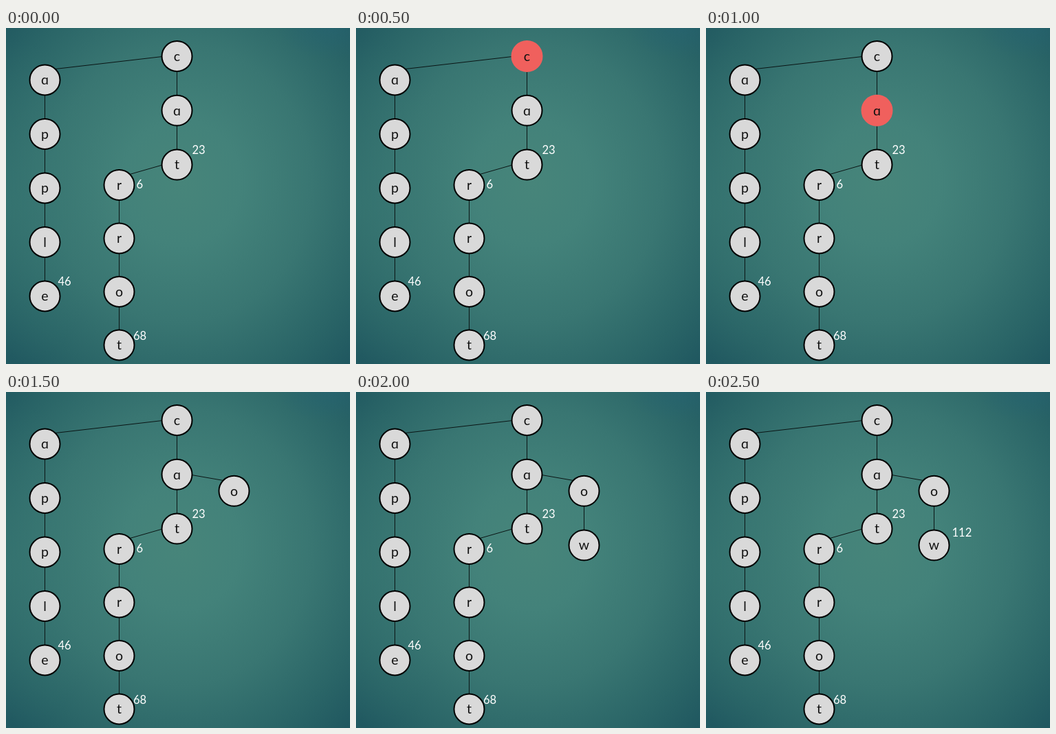
Recreate the animation shown at these times as an HTML page. Size 500 px wide and 488 px high, loop 3000 ms.

```html
<!DOCTYPE html>
<html lang="en">
<head>
<meta charset="utf-8">
<title>Trie insertion</title>
<style>
  html, body { margin: 0; width: 100%; height: 100%; overflow: hidden; }
  body {
    background:
      radial-gradient(ellipse 75px 45px at 470px 0, #27657399, #27657300),
      radial-gradient(ellipse 150px 240px at 0 255px, #3a7a7488, #3a7a7400),
      radial-gradient(ellipse 345px 365px at 255px 225px,
        #47857a 0%, #43827a 25%, #397672 55%, #2a6567 82%, #205860 100%);
  }
  svg { display: block; width: 500px; height: 488px; }
  line { stroke: #0a1414; stroke-width: 1; }
  circle { fill: #d9d9d9; stroke: #000; stroke-width: 2; }
  .active circle { fill: #f0605d; stroke: #f0605d; }
  text { font-family: Lato, "Noto Sans", sans-serif; }
  .letter { font-size: 19.5px; text-anchor: middle; fill: #111; }
  .value { font-size: 16.6px; fill: #fff; }
</style>
</head>
<body>
<svg viewBox="0 0 500 488"></svg>
<script>
const STEP = 500, STEPS = 6;
const svg = document.querySelector('svg');
const timed = [];

function add(parent, tag, attrs, text = '') {
  const el = document.createElementNS('http://www.w3.org/2000/svg', tag);
  for (const key in attrs) el.setAttribute(key, attrs[key]);
  el.textContent = text;
  return parent.appendChild(el);
}

function showFrom(el, step) {
  timed.push(now => el.setAttribute('visibility', now >= step ? 'visible' : 'hidden'));
}

function link(x1, y1, x2, y2, step = 0) {
  showFrom(add(svg, 'line', { x1, y1, x2, y2 }), step);
}

function node(x, y, letter, step = 0) {
  const g = add(svg, 'g', {});
  add(g, 'circle', { cx: x, cy: y, r: 22 });
  // The script form of "a" has a single storey.
  add(g, 'text', { class: 'letter', x, y: y + 6.8 }, letter.replace('a', 'ɑ'));
  showFrom(g, step);
  return g;
}

function chain(x, y, gap, word, step = 0) {
  if (word.length > 1) link(x, y, x, y + gap * (word.length - 1), step + (step && 1));
  return [...word].map((letter, i) => node(x, y + gap * i, letter, step && step + i));
}

function value(x, y, number, step = 0) {
  showFrom(add(svg, 'text', { class: 'value', x, y }, number), step);
}

link(227, 41.5, 72, 59.5);
link(227, 199, 180, 212.5);
link(270, 120.5, 316, 128.5, 3);

chain(56.5, 75.5, 78.5, 'apple');
const [c, a] = chain(248.5, 41, 78.8, 'cat');
chain(164.5, 228, 77.5, 'rrot');
chain(331.5, 143.8, 78.8, 'ow', 3);

value(75.5, 374, 46);
value(270.5, 182.5, 23);
value(189.5, 233, 6);
value(185, 452.5, 68);
value(357.5, 209.5, 112, 5);

[c, a].forEach((g, i) =>
  timed.push(now => g.classList.toggle('active', now === i + 1)));

function draw(time) {
  const now = Math.floor(time / STEP) % STEPS;
  timed.forEach(update => update(now));
}

let start;
function tick(time) {
  start ??= time;
  draw(time - start);
  requestAnimationFrame(tick);
}
draw(0);
requestAnimationFrame(tick);
</script>
</body>
</html>
```
